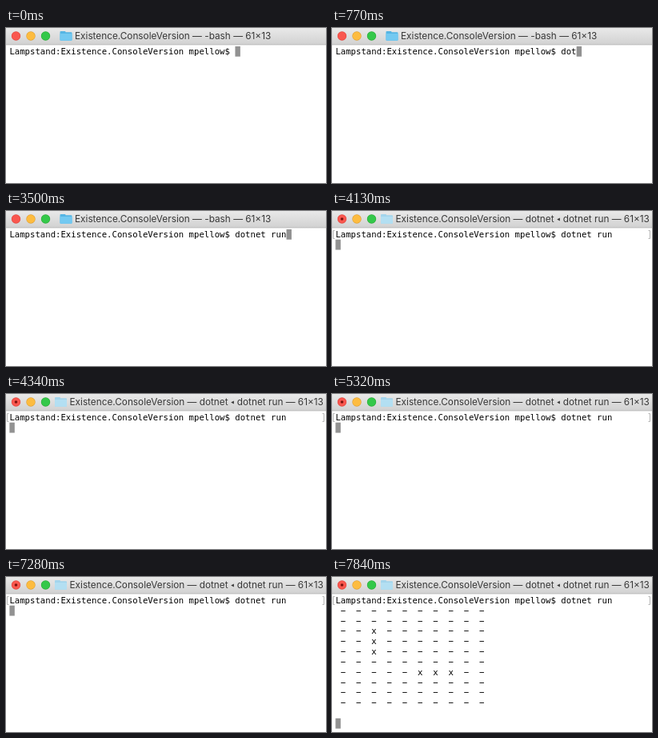
Write an HTML page with a canvas that moves like this. It is 400 px wide and 194 px high and loops after 8 s.

```html
<!DOCTYPE html>
<html lang="en">
<head>
<meta charset="utf-8">
<title>Terminal</title>
<style>
  html, body { margin: 0; width: 100%; height: 100%; overflow: hidden; background: #fff; }
  canvas { display: block; }
</style>
</head>
<body>
<canvas id="stage" width="400" height="194"></canvas>
<script>
const ctx = document.getElementById('stage').getContext('2d');

const LOOP = 8000;
const LEFT = 4.4, TOP = 22.9, CELL_W = 6.41, CELL_H = 12.83;
const MONO = '10.65px "DejaVu Sans Mono", monospace';
const SANS = '11.8px Inter, sans-serif';
const TITLE_COLOR = '#383838';

const PROMPT = 'Lampstand:Existence.ConsoleVersion mpellow$ ';
const COMMAND = 'dotnet run';
const KEY_TIMES = [140, 420, 560, 1260, 1330, 1400, 2310, 2520, 2660, 2800];
const ENTER = 4060, RETITLE = 4130, OUTPUT = 7700;

const GRID = 10;
const isAlive = (row, col) =>
  (col === 2 && row >= 2 && row <= 4) || (row === 6 && col >= 5 && col <= 7);

function rect(x, y, w, h, color) {
  ctx.fillStyle = color;
  ctx.fillRect(x, y, w, h);
}

// Returns the x position where the text ends.
function text(str, x, y, font, color) {
  ctx.font = font;
  ctx.fillStyle = color;
  ctx.fillText(str, x, y);
  return x + ctx.measureText(str).width;
}

function printAt(str, row, col) {
  text(str, LEFT + col * CELL_W, TOP + row * CELL_H + 10.1, MONO, '#000');
}

function cursorAt(row, col) {
  rect(LEFT + col * CELL_W, TOP + row * CELL_H, CELL_W, CELL_H, '#929292');
}

function disc(x, r, color) {
  ctx.beginPath();
  ctx.arc(x, 10, r, 0, Math.PI * 2);
  ctx.fillStyle = color;
  ctx.fill();
}

function light(x, fill, edge) {
  disc(x, 5.7, edge);
  disc(x, 5.1, fill);
}

function folder(x, back, front) {
  ctx.fillStyle = back;
  ctx.beginPath();
  ctx.roundRect(x, 4, 7, 5, 1);
  ctx.roundRect(x, 5.2, 15, 10.6, 1);
  ctx.fill();
  ctx.fillStyle = front;
  ctx.beginPath();
  ctx.roundRect(x, 7, 15, 8.8, 1);
  ctx.fill();
}

function arrowhead(x) {
  ctx.beginPath();
  ctx.moveTo(x + 0.3, 10.5);
  ctx.lineTo(x + 4, 8.5);
  ctx.lineTo(x + 4, 12.5);
  ctx.fill();
  return x + 4.6;
}

function titleBar(running) {
  const shade = ctx.createLinearGradient(0, 0, 0, 20);
  shade.addColorStop(0, '#e9e9e9');
  shade.addColorStop(1, '#d2d2d2');
  rect(0, 0, 400, 20.3, shade);
  rect(0, 20.3, 400, 1, '#b0b0b0');

  light(12.5, '#f9574f', '#e2463f');
  light(31, '#fdbc40', '#e0a032');
  light(49.5, '#34c84a', '#28ab35');
  if (running) disc(12.5, 1.8, '#7d1410');

  const title = (str, x) => text(str, x, 14.2, SANS, TITLE_COLOR);
  if (running) {
    folder(61, '#a3d5ec', '#b3dff2');
    const end = title('Existence.ConsoleVersion — dotnet ', 79.5);
    title(' dotnet run — 61×13', arrowhead(end));
  } else {
    folder(67.5, '#55b5e4', '#73c9f1');
    title('Existence.ConsoleVersion — -bash — 61×13', 86);
  }
}

function bracket(x, dir) {
  ctx.strokeStyle = '#b4b4b4';
  ctx.lineWidth = 1;
  ctx.beginPath();
  ctx.moveTo(x + 2 * dir, 24.5);
  ctx.lineTo(x, 24.5);
  ctx.lineTo(x, 34.5);
  ctx.lineTo(x + 2 * dir, 34.5);
  ctx.stroke();
}

function printGrid() {
  for (let row = 0; row < GRID; row++) {
    for (let col = 0; col < GRID; col++) {
      printAt(isAlive(row, col) ? 'x' : '−', row + 1, col * 3 + 1);
    }
  }
}

function draw(t) {
  rect(0, 0, 400, 194, '#fff');
  titleBar(t >= RETITLE);

  const typed = KEY_TIMES.filter(time => t >= time).length;
  if (t < ENTER) {
    cursorAt(0, PROMPT.length + typed);
  } else {
    bracket(1.5, 1);
    bracket(397.5, -1);
    cursorAt(t < OUTPUT ? 1 : GRID + 2, 0);
  }
  printAt(PROMPT + COMMAND.slice(0, typed), 0, 0);
  if (t >= OUTPUT) printGrid();
}

let start;
function tick(now) {
  start ??= now;
  draw((now - start) % LOOP);
  requestAnimationFrame(tick);
}
draw(0);
requestAnimationFrame(tick);
</script>
</body>
</html>
```
